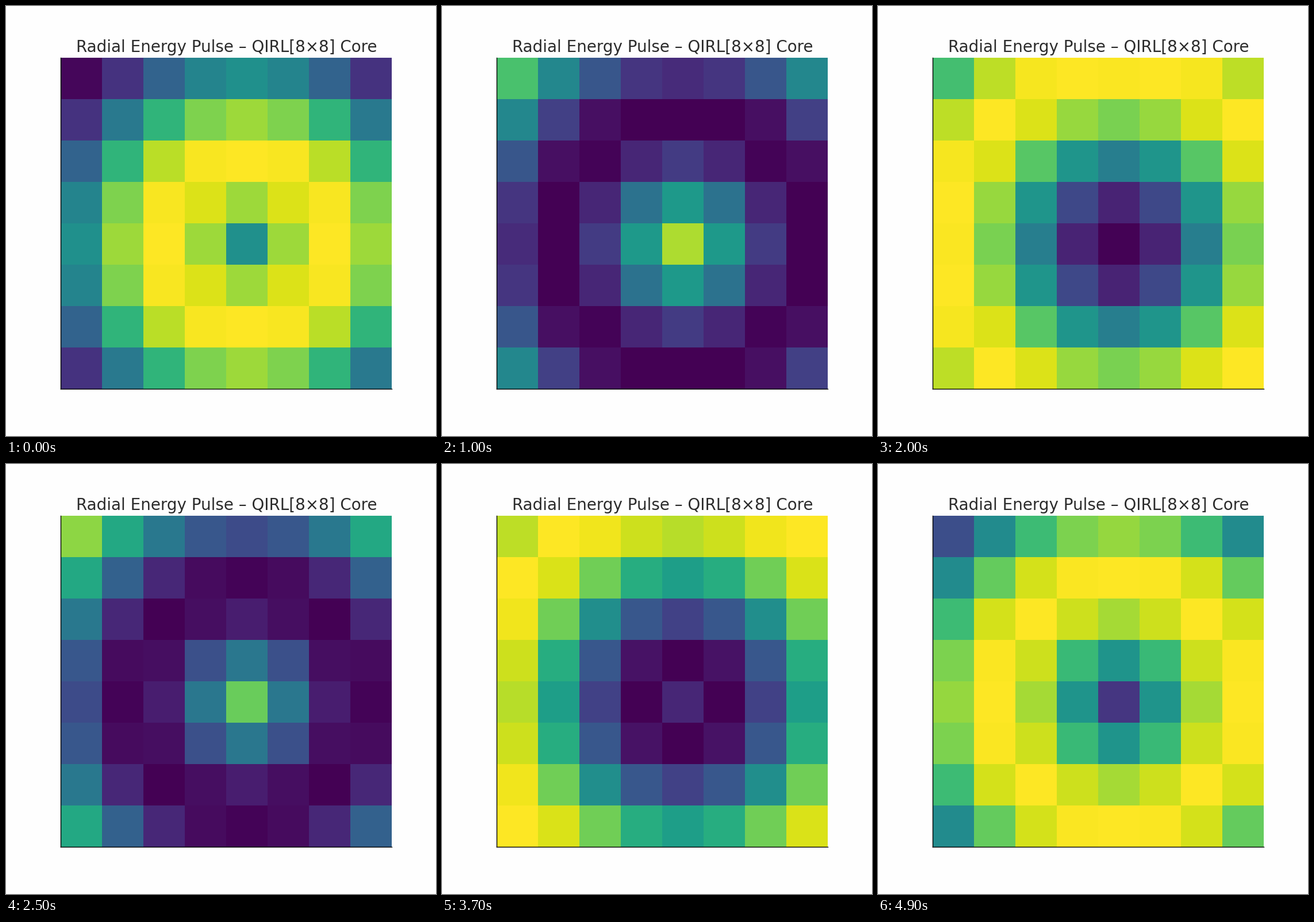
These frames come from a looping animation (748 by 748 pixels, 5 s). A matplotlib script:

```python
import numpy as np
import matplotlib.pyplot as plt
from matplotlib.animation import FuncAnimation

SIZE_PX, DPI = 748, 100
FRAMES, INTERVAL_MS = 50, 100
GRID = 8
PHASE_STEP = 0.4  # radians the wave travels outward per frame

plt.rcParams["font.family"] = "DejaVu Sans"

rows, cols = np.indices((GRID, GRID))
radius = np.hypot(rows - GRID // 2, cols - GRID // 2)


def pulse(frame):
    return np.sin(2 * np.pi * radius / GRID - PHASE_STEP * frame)


fig, ax = plt.subplots(figsize=(SIZE_PX / DPI, SIZE_PX / DPI), dpi=DPI,
                       facecolor="#fefefe")
image = ax.imshow(pulse(0), cmap="viridis", vmin=-1, vmax=1,
                  interpolation="nearest")
ax.set_title("Radial Energy Pulse – QIRL[8×8] Core", fontsize=20, pad=7.2,
             color="#2b2b2b")
ax.set_xticks([])
ax.set_yticks([])
ax.spines[["top", "right"]].set_visible(False)
ax.spines[["left", "bottom"]].set_linewidth(1.0)


def update(frame):
    image.set_data(pulse(frame))
    return [image]


animation = FuncAnimation(fig, update, frames=FRAMES, interval=INTERVAL_MS,
                          repeat=True, repeat_delay=0)
plt.show()
```
